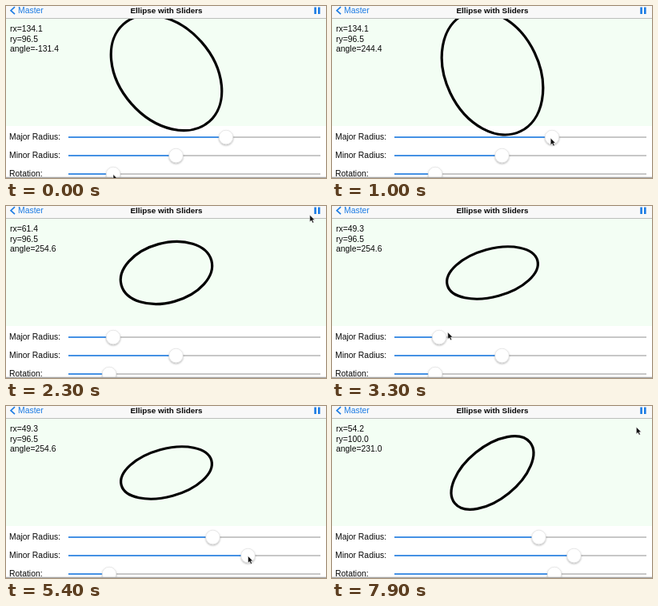
Write an HTML page that moves like this. It is 400 by 215 pixels and loops after 8000 ms.

```html
<!DOCTYPE html>
<html lang="en">
<head>
<meta charset="utf-8">
<title>Ellipse with Sliders</title>
<style>
  html, body { margin: 0; width: 100%; height: 100%; overflow: hidden; background: #fff; }
  svg { display: block; width: 100%; height: 100%; }
  text { font: 10.4px "Liberation Sans", Arial, sans-serif; fill: #080808; }
  .title { font-size: 9.9px; font-weight: bold; text-anchor: middle; }
  .blue { fill: #1b7be4; }
</style>
</head>
<body>
<svg viewBox="0 0 400 215">
  <defs>
    <clipPath id="stage"><rect y="15" width="400" height="200"/></clipPath>
    <filter id="shadow" x="-30%" y="-30%" width="160%" height="170%">
      <feDropShadow dx="0" dy="1.2" stdDeviation="1" flood-opacity=".32"/>
    </filter>
  </defs>
  <rect width="400" height="150" fill="#f3fef4"/>
  <g clip-path="url(#stage)">
    <ellipse id="shape" fill="none" stroke="#000" stroke-width="3.2"/>
  </g>
  <rect width="400" height="15" fill="#f8f8f8"/>
  <path d="M0 15.5H400" stroke="#bcbfbc"/>
  <path d="M11 1.2L6 5.7L11 10.2" fill="none" stroke="#1b7be4" stroke-width="1.6"/>
  <text class="blue" x="15" y="9.3">Master</text>
  <text class="title" x="200.5" y="9.3">Ellipse with Sliders</text>
  <path class="blue" d="M385.3 1.5h2.6v8.5h-2.6zM390 1.5h2.6v8.5h-2.6z"/>
  <text id="rx" x="5" y="32"></text>
  <text id="ry" x="5" y="44.5"></text>
  <text id="angle" x="5" y="57"></text>
  <g id="sliders"></g>
  <path d="M0 214.3H400" stroke="#a4a4a4" stroke-width="1.2"/>
  <path id="cursor" d="M0 0V8.6L2 6.9L3.5 10L5 9.3L3.6 6.3H6.2Z" fill="#111" stroke="#fff" stroke-width=".5"/>
</svg>
<script>
const LOOP = 8000, SCALE = 0.605, GLIDE = 800;
const $ = id => document.getElementById(id);
const ramp = (t, from, to) => Math.min(1, Math.max(0, (t - from) / (to - from)));
const ease = (t, from, to) => {
  const u = ramp(t, from, to);
  return u * u * (3 - 2 * u);
};
const mix = (a, b, u) => a + (b - a) * u;
const rowY = row => 164 + 23 * row;

// What the pointer does in turn: drag a thumb or rest at a place.
const drag = (row, from, to, start, end) => ({ row, from, to, start, end, y: rowY(row) + 0.5 });
const rest = (x, y, start, end) => ({ from: x, to: x, y, start, end });
const actions = [
  drag(2, 134, 129, 0, 300),
  drag(0, 275, 134, 1050, 1650),
  rest(388, 6, 2380, 2600),
  drag(0, 134, 258.5, 3700, 4350),
  drag(1, 212.5, 302.5, 4700, 5400),
  drag(2, 129, 278, 5800, 6350),
  rest(393, 76, 7000, 7100),
  rest(388, 6, 7450, 7600),
  rest(379, 30, LOOP, LOOP + 1)
];

function pointerAt(t) {
  const next = actions.findIndex(a => a.start > t);
  const a = actions[next - 1], b = actions[next];
  if (t < a.end) return [mix(a.from, a.to, ease(t, a.start, a.end)), a.y];
  const u = ease(t, a.end, Math.min(a.end + GLIDE, b.start));
  return [mix(a.to, b.from, u), mix(a.y, b.y, u)];
}

function thumbAt(row, t) {
  const drags = actions.filter(a => a.row === row);
  return drags.reduce((x, a) => x + (a.to - a.from) * ease(t, a.start, a.end), drags[0].from);
}

// The ellipse chases the sliders at constant speed until paused, and again after 7.6 s.
function ellipseAt(t) {
  const resumed = Math.max(0, t - 7600) / 1000;
  return {
    rx: mix(134.1, 49.3, ramp(t, 1110, 2500)) + 16.3 * resumed,
    ry: 96.5 + 11.7 * resumed,
    angle: mix(228.6, 254.6, ramp(t, 0, 1646)) - 78.3 * resumed
  };
}

$('sliders').innerHTML = ['Major Radius:', 'Minor Radius:', 'Rotation:'].map((label, row) => {
  const y = rowY(row);
  return `<text x="4" y="${y + 3}">${label}</text>
    <path d="M78 ${y}H393" stroke="#b5b5b5" stroke-width="1.3"/>
    <path class="fill" stroke="#1a7fee" stroke-width="1.5"/>
    <circle class="thumb" cy="${y}" r="8.8" fill="#fff" stroke="#d5d5d5" stroke-width=".5" filter="url(#shadow)"/>`;
}).join('');
const fills = document.querySelectorAll('.fill');
const thumbs = document.querySelectorAll('.thumb');

function draw(t) {
  const { rx, ry, angle } = ellipseAt(t);
  $('shape').setAttribute('rx', rx * SCALE);
  $('shape').setAttribute('ry', ry * SCALE);
  $('shape').setAttribute('transform', `translate(200.5 83.5) rotate(${angle})`);
  $('rx').textContent = 'rx=' + rx.toFixed(1);
  $('ry').textContent = 'ry=' + ry.toFixed(1);
  // The readout is signed while the rotation thumb is first held.
  $('angle').textContent = 'angle=' + (t < actions[0].end ? angle - 360 : angle).toFixed(1);
  thumbs.forEach((thumb, row) => {
    const x = thumbAt(row, t);
    thumb.setAttribute('cx', x);
    fills[row].setAttribute('d', `M78 ${rowY(row)}H${x}`);
  });
  $('cursor').setAttribute('transform', `translate(${pointerAt(t)})`);
}

const start = performance.now();
function tick() {
  draw((performance.now() - start) % LOOP);
  requestAnimationFrame(tick);
}
tick();
</script>
</body>
</html>
```
